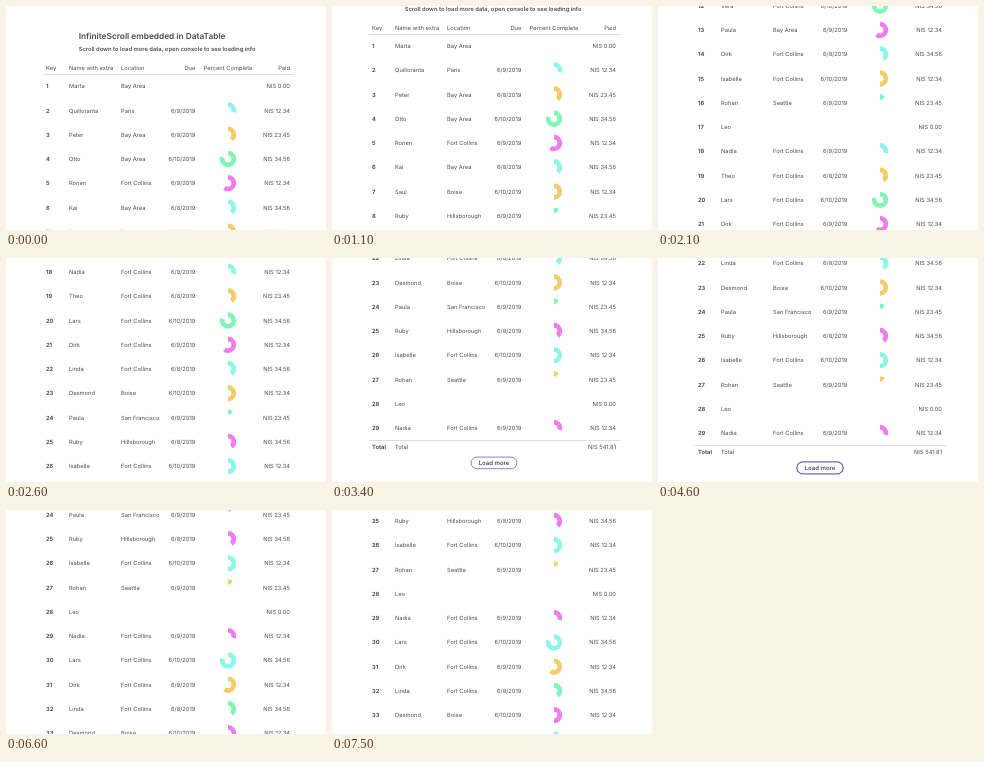
Animation, 320 px wide and 224 px high, one loop 8000 ms. Source, as an HTML page with a canvas:

```html
<!DOCTYPE html>
<html lang="en">
<head>
<meta charset="utf-8">
<title>Infinite scroll table</title>
<style>
html, body { margin: 0; width: 100%; height: 100%; overflow: hidden; background: #fff; }
canvas { display: block; width: 320px; height: 224px; }
</style>
</head>
<body>
<canvas id="stage"></canvas>
<script>
const W = 320, H = 224, LOOP = 8000, STEP = 100;
const ROW_TOP = 80.2, ROW_H = 24.26;
const INK = '#4c4c4c', BRAND = '#7663bd', LINE = '#c8c8c8';
const FONT = 'Inter, Roboto, sans-serif';
const TEXT_SCALE = 16;
const COLORS = ['#80f5b4', '#f07cf0', '#8cf6e8', '#f6cc68'];
const COL = { key: 40, name: 63, place: 115, due: 189.3, meter: 222, paid: 284 };

const NAMES = ('Marta Quilloranta Peter Otto Ronen Kai Saul Ruby Hugo Felix Lars Vera ' +
  'Paula Dirk Isabelle Rohan Leo Nadia Theo Lars Dirk Linda Desmond Paula Ruby ' +
  'Isabelle Rohan Leo Nadia Lars Dirk Linda Desmond Paula').split(' ');
const PLACES = {
  1: 'Bay Area', 2: 'Paris', 3: 'Bay Area', 4: 'Bay Area', 6: 'Bay Area', 7: 'Boise',
  8: 'Hillsborough', 9: '', 13: 'Bay Area', 16: 'Seattle', 17: '', 23: 'Boise',
  24: 'San Francisco', 25: 'Hillsborough', 27: 'Seattle', 28: '', 33: 'Boise',
  34: 'San Francisco'
};

// Percent, day of June and amount repeat every eight records.
const PERCENT = [0, 30, 40, 80, 60, 40, 50, 10];
const DAY = [0, 9, 8, 10, 9, 8, 10, 9];
const PAID = ['0.00', '12.34', '23.45', '34.56', '12.34', '34.56', '12.34', '23.45'];

const rows = NAMES.map((name, i) => {
  const key = i + 1;
  const shift = key < 25 ? -1 : key < 30 ? 4 : 5;
  const kind = (key + shift) % 8;
  return {
    key, name,
    place: PLACES[key] ?? 'Fort Collins',
    due: kind ? `6/${DAY[kind]}/2019` : '',
    percent: PERCENT[kind],
    paid: 'NIS ' + PAID[kind],
    color: COLORS[key % 4]
  };
});

// Scroll keys: time, offset, speed in px per ms.
const SCROLL = [
  [800, 0, 0], [1600, 196, 0.31], [2600, 478.6, 0.23], [3400, 589.4, 0],
  [3900, 584.4, 0], [6200, 584.4, 0], [6700, 639, 0], [7300, 639, 0], [7500, 651.4, 0.1]
];

function scrollAt(t) {
  if (t <= SCROLL[0][0]) return SCROLL[0][1];
  const next = SCROLL.findIndex(k => t < k[0]);
  if (next < 0) return SCROLL[SCROLL.length - 1][1];
  const [t0, y0, v0] = SCROLL[next - 1];
  const [t1, y1, v1] = SCROLL[next];
  const d = t1 - t0, u = (t - t0) / d, w = 1 - u;
  return w * w * ((1 + 2 * u) * y0 + u * d * v0) + u * u * ((3 - 2 * u) * y1 - w * d * v1);
}

const canvas = document.getElementById('stage');
const ctx = canvas.getContext('2d');
const ratio = window.devicePixelRatio || 1;
canvas.width = W * ratio;
canvas.height = H * ratio;
ctx.textRendering = 'geometricPrecision';

const rowY = key => ROW_TOP + (key - 1) * ROW_H;

// Set large and scaled down evenly, so that small sizes keep unrounded letter spacing.
function text(str, x, midY, { align = 'left', weight = 400, size = 5.75 } = {}) {
  ctx.save();
  ctx.translate(x, midY + size * 0.36);
  ctx.scale(1 / TEXT_SCALE, 1 / TEXT_SCALE);
  ctx.font = `${weight} ${size * TEXT_SCALE}px ${FONT}`;
  ctx.textAlign = align;
  ctx.fillStyle = INK;
  ctx.fillText(str, 0, 0);
  ctx.restore();
}

function rule(y) {
  ctx.fillStyle = LINE;
  ctx.fillRect(37, y, 251, 0.6);
}

function drawHead() {
  text('InfiniteScroll embedded in DataTable', 72.7, 30.2, { weight: 600, size: 8.3 });
  text('Scroll down to load more data, open console to see loading info', 72.7, 43,
    { weight: 600, size: 5.8 });
  text('Key', COL.key, 62);
  text('Name with extra', COL.name, 62);
  text('Location', COL.place, 62);
  text('Due', COL.due, 62, { align: 'right' });
  text('Percent Complete', COL.meter, 62, { align: 'center' });
  text('Paid', COL.paid, 62, { align: 'right' });
  rule(68.2);
}

function drawMeter(y, percent, color) {
  if (!percent) return;
  const start = -Math.PI / 2;
  ctx.beginPath();
  ctx.arc(COL.meter, y, 5.8, start, start + percent / 100 * 2 * Math.PI);
  ctx.lineWidth = 4.8;
  ctx.strokeStyle = color;
  ctx.stroke();
}

function drawRow(row) {
  const y = rowY(row.key);
  text(row.key, COL.key, y, { weight: 700 });
  text(row.name, COL.name, y);
  text(row.place, COL.place, y);
  text(row.due, COL.due, y, { align: 'right' });
  text(row.paid, COL.paid, y, { align: 'right' });
  drawMeter(y, row.percent, row.color);
}

function drawTotal(y, amount) {
  rule(y - 6.3);
  text('Total', COL.key, y, { weight: 700 });
  text('Total', COL.name, y);
  text('NIS ' + amount, COL.paid, y, { align: 'right' });
}

function drawButton(y, t) {
  const loading = t >= 5000;
  const line = t < 4600 ? 0.8 : t < 4700 ? 1.3 : 1.6;
  const w = (loading ? 66.2 : 45) + line, h = 10.8 + line;
  ctx.beginPath();
  ctx.roundRect(162 - w / 2, y - h / 2, w, h, h / 2);
  ctx.lineWidth = line;
  ctx.strokeStyle = BRAND;
  ctx.stroke();
  text(loading ? 'Loading more...' : 'Load more', 162, y, { align: 'center', weight: 600, size: 6 });
}

function draw(t) {
  const scroll = scrollAt(t);
  const count = t < 5900 ? 29 : t < 6000 ? 30 : rows.length;
  ctx.setTransform(ratio, 0, 0, ratio, 0, 0);
  ctx.fillStyle = '#fff';
  ctx.fillRect(0, 0, W, H);
  ctx.translate(0, -scroll);
  drawHead();
  for (const row of rows.slice(0, count)) {
    const y = rowY(row.key) - scroll;
    if (y > -12 && y < H + 12) drawRow(row);
  }
  const end = rowY(count);
  if (t < 5900) {
    drawTotal(end + 18.5, '541.81');
    drawButton(end + 34.8, t);
  } else if (t < 6000) {
    drawTotal(end + 22.3, '741.75');
  }
}

function frame(now) {
  draw(Math.floor(now % LOOP / STEP) * STEP);
  requestAnimationFrame(frame);
}

draw(0);
requestAnimationFrame(frame);
</script>
</body>
</html>
```
